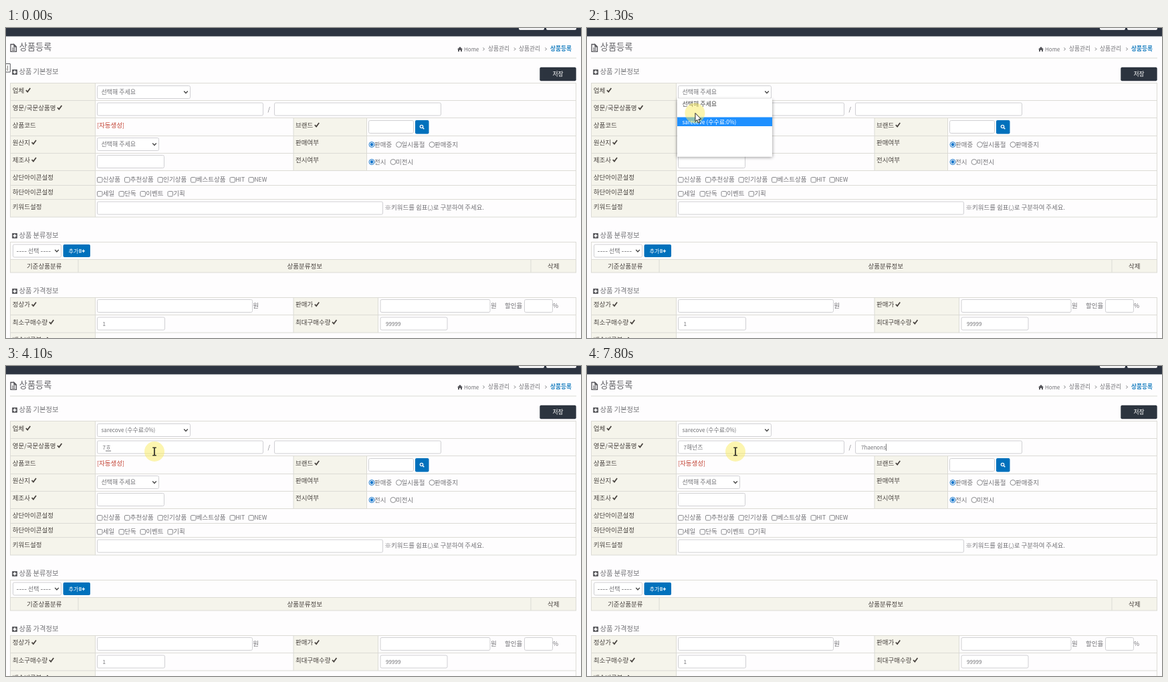
These frames come from a looping animation (860x464 px, 8000 ms). An HTML page with a canvas:

```html
<!DOCTYPE html>
<html lang="ko">
<head>
<meta charset="utf-8">
<title>상품등록</title>
<style>
html, body { margin: 0; width: 100%; height: 100%; overflow: hidden; background: #fefdfe; }
canvas { display: block; width: 860px; height: 464px; }
</style>
</head>
<body>
<canvas id="stage" width="860" height="464"></canvas>
<script>
const ctx = document.getElementById('stage').getContext('2d');
const LOOP = 8000, STEP = 100;
const BG = '#fefdfe', CELL = '#f5f4eb', LINE = '#dcdbd5', FIELD = '#d0d0d3';
const INK = '#48433f', GREY = '#727276', BLUE = '#0071bc', DARK = '#2c343f';
const FONT = '"Noto Sans CJK KR", "Noto Sans CJK JP", "Noto Sans CJK", sans-serif';
const VENDOR = 'sarecove (수수료:0%)', PROMPT = '선택해 주세요';

// Typed states: time, value, length of the syllable being composed
const NAME_KO = [[3000, '7', 0], [3600, '7ㅎ', 1], [4300, '7해', 1], [4400, '7핸', 1],
  [4500, '7해너', 1], [4600, '7해넌', 1], [4700, '7해넍', 1], [4800, '7해넌즈', 1], [5000, '7해넌즈', 0]];
const EN_WORD = '7haenons';
const EN_TIMES = [5900, 6400, 6800, 7000, 7400, 7500, 7700, 7800];
const PRESSES = [800, 1400, 2100];
const PATH = [[200, 2, 74], [700, 154, 97], [1100, 154, 97], [1400, 164, 138],
  [1600, 166, 138], [1700, 169, 134], [2000, 222, 128]];

// Draws mixed text centred on y, Latin a little smaller, and returns its right end
function text(str, x, y, size = 9.5, color = GREY, weight = 400) {
  ctx.fillStyle = color;
  for (const run of str.match(/[ㄱ-힣※]+|[^ㄱ-힣※]+/g) || []) {
    const scale = /[ㄱ-힣※]/.test(run) ? 1 : 0.92;
    ctx.font = `${weight} ${size * scale}px ${FONT}`;
    ctx.fillText(run, x, y + size * 0.37);
    x += ctx.measureText(run).width;
  }
  return x;
}

function rect(x, y, w, h, color) {
  ctx.fillStyle = color;
  ctx.fillRect(x, y, w, h);
}

function path(points, color, width) {
  ctx.beginPath();
  points.forEach(([x, y]) => ctx.lineTo(x, y));
  ctx.strokeStyle = color;
  ctx.lineWidth = width;
  ctx.stroke();
}

function round(x, y, w, h, fill, stroke, r = 2) {
  ctx.beginPath();
  ctx.roundRect(x, y, w, h, r);
  if (fill) { ctx.fillStyle = fill; ctx.fill(); }
  if (stroke) { ctx.strokeStyle = stroke; ctx.lineWidth = 1; ctx.stroke(); }
}

function disc(x, y, r, fill, stroke, width = 1) {
  ctx.beginPath();
  ctx.arc(x, y, r, 0, 7);
  if (fill) { ctx.fillStyle = fill; ctx.fill(); }
  if (stroke) { ctx.strokeStyle = stroke; ctx.lineWidth = width; ctx.stroke(); }
}

const hline = (x, y, w) => rect(x, y, w, 1, LINE);
const vline = (x, y, h) => rect(x, y, 1, h, LINE);
const field = (x, y, w, h = 20) => round(x + .5, y + .5, w - 1, h - 1, '#fff', FIELD);

function select(x, y, w, label) {
  field(x, y, w, 20);
  if (label) text(label, x + 6.5, y + 10, 9);
  const cx = x + w - 7, cy = y + 10;
  path([[cx - 2.8, cy - 1.5], [cx, cy + 1.5], [cx + 2.8, cy - 1.5]], '#444', 1.3);
}

function label(str, x, y, required) {
  const end = text(str, x, y, 9.5, INK, 500);
  if (required) path([[end + 2.6, y + .2], [end + 4.9, y + 2.6], [end + 9, y - 3]], INK, 1.7);
}

function section(str, y) {
  round(9, y - 4, 8, 8, '#606064', null, 1);
  rect(10.5, y - .8, 5, 1.6, '#fff');
  rect(12.2, y - 2.5, 1.6, 5, '#fff');
  text(str, 19.5, y - .5, 10.3);
}

function radio(x, y, on, str) {
  disc(x, y, 4, '#fff', on ? '#1a78cc' : '#8a8a8e');
  if (on) disc(x, y, 2.4, '#1a78cc');
  text(str, x + 4, y - .5);
}

function check(x, y, str) {
  round(x + .5, y - 3.5, 7.5, 7.5, '#fff', '#8a8a8e', 1.5);
  text(str, x + 8.7, y - 1);
}

function header() {
  rect(0, 0, 860, 12.5, '#2d3441');
  round(767, -6, 38, 9, '#f3f3f4');
  round(808, -6, 45, 9, '#f3f3f4');
  path([[12, 24.5], [7, 24.5], [7, 35.3], [15.5, 35.3], [15.5, 28], [12, 24.5], [12, 28], [15.5, 28]], '#55555a', 1.3);
  for (const y of [29.5, 31.3, 33.1]) rect(9, y, 4.7, .9, '#55555a');
  text('상품등록', 19.8, 28, 13.2, '#646468');
  hline(6, 44.5, 847);

  ctx.fillStyle = '#55555a';
  ctx.beginPath();
  for (const [x, y] of [[675, 32], [679, 28], [683, 32], [682, 32], [682, 35.3], [680, 35.3],
    [680, 33], [678, 33], [678, 35.3], [676, 35.3], [676, 32]]) ctx.lineTo(x, y);
  ctx.fill();
  text('Home', 685, 31.5, 8.7);
  for (const x of [713.5, 760, 806.5]) path([[x, 29.5], [x + 2, 31.5], [x, 33.5]], GREY, 1);
  text('상품관리', 721, 31, 8.7);
  text('상품관리', 767, 31, 8.7);
  text('상품등록', 814, 31, 8.7, '#1b7fc0', 700);
}

function basics(vendor) {
  section('상품 기본정보', 66);
  round(798.3, 58.7, 54.4, 20.5, DARK);
  text('저장', 817.5, 69, 8.8, '#fff', 500);

  rect(6, 82, 127, 201, CELL);
  rect(430, 135, 109, 78, CELL);
  for (const y of [82, 108, 134, 161, 187, 213, 235, 256, 282.5]) hline(6, y, 847);
  for (const x of [6, 133, 852]) vline(x, 82, 201);
  vline(429.5, 134, 79);
  vline(539, 134, 79);

  label('업체', 9.8, 93, true);
  label('영문/국문상품명', 9.8, 119, true);
  label('상품코드', 9.8, 145);
  label('원산지', 9.8, 171, true);
  label('제조사', 9.8, 197, true);
  label('상단아이콘설정', 9.8, 223.5);
  label('하단아이콘설정', 9.8, 245);
  label('키워드설정', 9.8, 267);
  label('브랜드', 433, 145, true);
  label('판매여부', 433, 171);
  label('전시여부', 433, 197);

  select(136, 86, 140, vendor);
  field(136, 111.5, 249);
  text('/', 391.5, 121.5, 9.5);
  field(401, 111.5, 250);
  text('[자동생성]', 136, 145, 9.5, '#c24334');
  field(542, 138, 68);
  round(612, 138, 20.5, 20.5, BLUE);
  disc(621.5, 147.5, 2.2, null, '#fff', 1.2);
  path([[623, 149], [625.3, 151.3]], '#fff', 1.5);
  select(136, 164, 93, PROMPT);
  field(136, 190, 101);
  field(136, 259.5, 428);
  text('※키워드를 쉼표(,)로 구분하여 주세요.', 566.5, 268.5);

  radio(547, 174.5, true, '판매중');
  radio(587.5, 174.5, false, '일시품절');
  radio(637, 174.5, false, '판매중지');
  radio(547, 200.5, true, '전시');
  radio(579, 200.5, false, '미전시');
  [[136, '신상품'], [177, '추천상품'], [226.5, '인기상품'], [276, '베스트상품'], [334.5, 'HIT'], [362.5, 'NEW']]
    .forEach(([x, s]) => check(x, 227, s));
  [[136, '세일'], [168.5, '단독'], [200.5, '이벤트'], [241.5, '기획']]
    .forEach(([x, s]) => check(x, 248, s));
}

function categories() {
  section('상품 분류정보', 311);
  rect(6, 346, 847, 20, CELL);
  for (const y of [320, 346, 365.5]) hline(6, y, 847);
  vline(6, 320, 46);
  vline(852, 320, 46);
  vline(107.5, 346, 20);
  vline(784.5, 346, 20);
  select(10, 323.5, 73);
  text('----', 15.5, 333.5, 12.2);
  text('선택', 33, 333.5, 9);
  text('----', 51.5, 333.5, 12.2);
  round(85.5, 324, 40.5, 19, BLUE);
  text('추가', 93.5, 333.5, 8.2, '#fff', 500);
  for (const y of [331.3, 333.3, 335.3]) rect(109, y, 4, 1, '#fff');
  rect(113.5, 333.2, 4.5, 1.2, '#fff');
  rect(115.2, 331.5, 1.2, 4.6, '#fff');
  label('기준상품분류', 31, 356);
  label('상품분류정보', 420.5, 356);
  label('삭제', 810, 356);
}

function prices() {
  section('상품 가격정보', 394);
  rect(6, 403, 127, 61, CELL);
  rect(430, 403, 126, 53, CELL);
  for (const y of [403, 429, 455.5]) hline(6, y, 847);
  for (const x of [6, 133, 852]) vline(x, 403, 61);
  vline(429.5, 403, 53);
  vline(556, 403, 53);
  label('정상가', 9.8, 413.5, true);
  label('최소구매수량', 9.8, 440, true);
  label('배송비구분', 9.8, 466, true);
  label('판매가', 433, 413.5, true);
  label('최대구매수량', 433, 440, true);
  field(136, 406, 233);
  text('원', 369.2, 415.5);
  field(559.5, 406, 165);
  text('원', 725, 415.5);
  text('할인율', 746, 415.5);
  field(775, 406, 43);
  text('%', 818, 415.5);
  field(136, 432.5, 102);
  text('1', 144.5, 443, 8.8);
  field(559.5, 432.5, 101);
  text('99999', 568, 443, 8.8);
}

function popup(t) {
  if (t < 900 || t >= 1500) return;
  const x = 135, y = 105.5, w = 142, h = 87;
  const open = t >= 1000;
  ctx.save();
  ctx.beginPath();
  ctx.rect(0, 0, 860, 464);
  ctx.rect(x, y, w, h);
  ctx.clip('evenodd');
  ctx.shadowColor = `rgba(0,0,0,${open ? .45 : .35})`;
  ctx.shadowBlur = 5;
  ctx.shadowOffsetY = 1;
  rect(x, y, w, h, '#fff');
  ctx.restore();
  rect(x, y, w, h, open ? '#fff' : 'rgba(255,255,255,.12)');
  if (!open) return;
  const row = t < 1300 ? 0 : 2;
  rect(x, y + 1 + row * 13.5, w, 13.5, '#1e90ff');
  text(PROMPT, 142.5, y + 8, 9, row ? '#444' : '#fff');
  text(VENDOR, 142.5, y + 35, 9, row ? '#fff' : '#444');
}

function typing(t) {
  const [, ko, composing] = NAME_KO.filter(k => k[0] <= t).pop() || [0, '', 0];
  const en = EN_WORD.slice(0, EN_TIMES.filter(k => k <= t).length);
  const cut = ko.length - composing;
  const mid = text(ko.slice(0, cut), 144.5, 121.7, 8.8);
  const end = text(ko.slice(cut), mid, 121.7, 8.8);
  if (composing) rect(mid, 126.6, end - mid, 1, GREY);
  const enEnd = text(en, 410, 121.7, 8.8);

  // The caret shows for half a second after each key
  const last = Math.max(-1e4, ...[2100, ...NAME_KO.map(k => k[0]), ...EN_TIMES].filter(k => k <= t));
  if (t - last < 500) rect(t < 5000 ? end : enEnd, 116.5, .9, 10.5, '#666');
}

function position(t) {
  let a = PATH[0];
  for (const b of PATH) {
    if (t < b[0]) {
      const u = (t - a[0]) / (b[0] - a[0]), e = u * u * (3 - 2 * u);
      return [a[1] + (b[1] - a[1]) * e, a[2] + (b[2] - a[2]) * e];
    }
    a = b;
  }
  return [a[1], a[2]];
}

function pointer(t) {
  if (t < 200) return;
  const [x, y] = position(t);
  disc(x, y, 15, 'rgba(250,236,95,.5)');
  for (const p of PRESSES) {
    const age = (t - p) / 100;
    if (age < 0 || age > 3) continue;
    const alpha = age > 1 ? .8 - age * .22 : .55;
    // A wide soft band under a narrow one
    for (const width of [4.5, 2]) disc(x, y, 5 + age * 5.5, null, `rgba(240,92,50,${alpha})`, width);
  }
  ctx.save();
  ctx.translate(x, y);
  if (t >= 1800) {
    path([[0, -5.5], [0, 5.5]], '#111', 1.5);
    path([[-2.8, -5.8], [2.8, -5.8]], '#111', 1.2);
    path([[-2.8, 5.8], [2.8, 5.8]], '#111', 1.2);
  } else {
    ctx.beginPath();
    for (const [px, py] of [[.5, 0], [.5, 12.6], [3.3, 10], [5.3, 14.8], [7.5, 13.8], [5.5, 9.2], [9.2, 9]])
      ctx.lineTo(px, py);
    ctx.closePath();
    ctx.fillStyle = '#fff';
    ctx.fill();
    ctx.strokeStyle = '#222';
    ctx.lineWidth = 1;
    ctx.stroke();
  }
  ctx.restore();
}

function draw(t) {
  rect(0, 0, 860, 464, BG);
  header();
  basics(t < 1500 ? PROMPT : VENDOR);
  categories();
  prices();
  if (t < 200) {
    round(-10, 53.5, 16.3, 12.5, '#fff', '#55555a', 0);
    text('시', -4, 60, 8.5, INK);
  }
  popup(t);
  typing(t);
  pointer(t);
}

const start = performance.now();
let shown = -1;
function tick() {
  const t = Math.floor(((performance.now() - start) % LOOP) / STEP) * STEP;
  if (t !== shown) draw(shown = t);
  requestAnimationFrame(tick);
}
tick();
</script>
</body>
</html>
```
